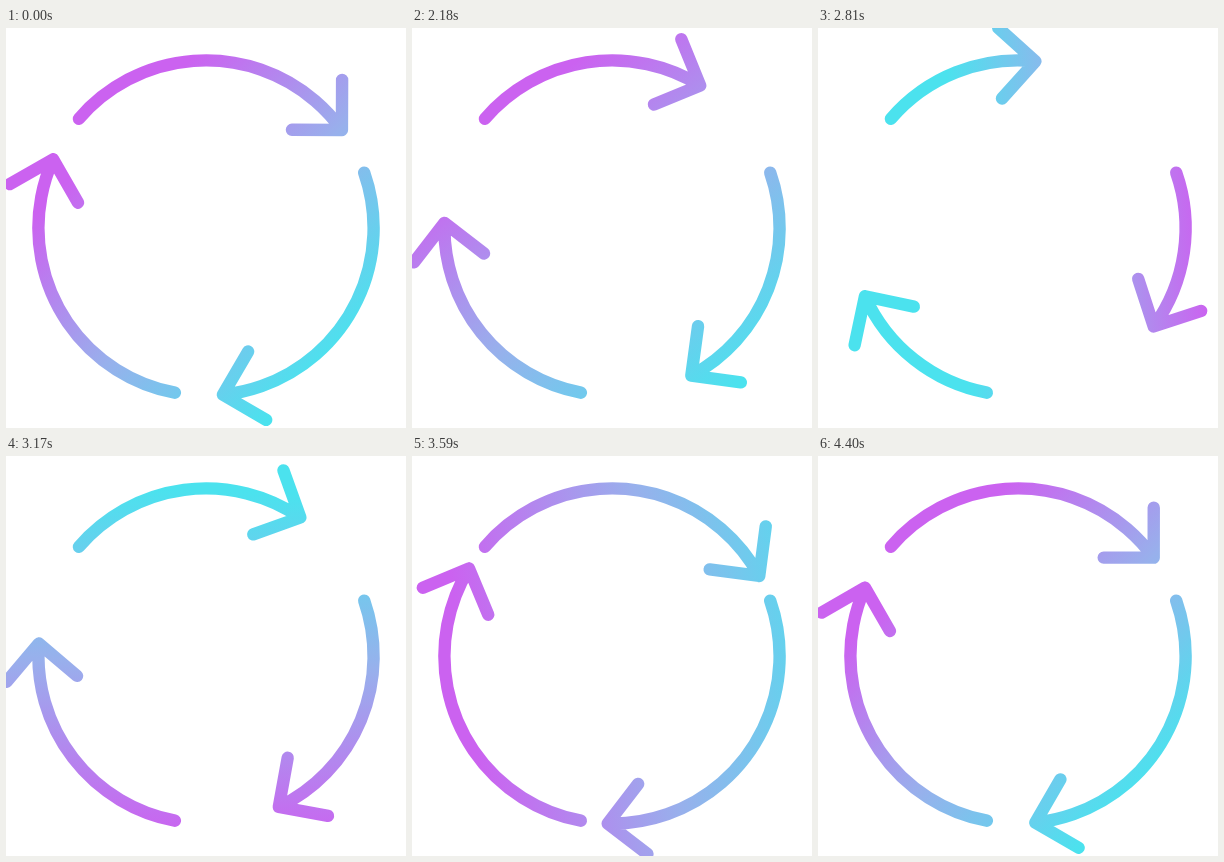
An HTML page with a canvas that plays this animation: 400 by 400 pixels, repeating every 4.43 s.

```html
<!DOCTYPE html>
<html lang="en">
<head>
<meta charset="utf-8">
<title>Cycle arrows</title>
<style>
  html, body { margin: 0; width: 100%; height: 100%; overflow: hidden; background: #fff; }
  canvas { display: block; width: 400px; height: 400px; }
</style>
</head>
<body>
<canvas id="stage" width="400" height="400"></canvas>
<script>
const ctx = document.getElementById('stage').getContext('2d');
const LOOP = 4430, HOLD = 2000, STEP = 30, MOVE = LOOP - HOLD;
const CENTER = 200, RADIUS = 167.6, ARM = 50;
const TAILS = [220.7, 340.7, 100.7];
const rad = deg => deg * Math.PI / 180;

// Cubic timing curve with control points (x1, 0) and (x2, 1).
function ease(u, x1, x2) {
  let lo = 0, hi = 1;
  for (let i = 0; i < 24; i++) {
    const m = (lo + hi) / 2, n = 1 - m;
    const x = 3 * x1 * m * n * n + 3 * x2 * m * m * n + m * m * m;
    if (x < u) lo = m; else hi = m;
  }
  return lo * lo * (3 - 2 * lo);
}

// Each key: time, value, then the timing curve leading to the next key.
function track(keys, time) {
  let i = 0;
  while (i < keys.length - 2 && time >= keys[i + 1][0]) i++;
  const [t0, v0, x1 = 0.36, x2 = 0.64] = keys[i];
  const [t1, v1] = keys[i + 1];
  return v0 + (v1 - v0) * ease((time - t0) / (t1 - t0), x1, x2);
}

const SPAN = [
  [0, 103.5, 0.24, 0.02],
  [860, 55.2, 0.43, 0.6],
  [1470, 112.5, 0.39, 0.6],
  [2060, 93.8, 0.5, 0.6],
  [MOVE, 103.5]
];
const WARM_REACH = [[0, 130], [330, 170], [810, 185], [1170, 182], [1590, 148], [MOVE, 130]];
const COOL_REACH = [[0, 180], [330, 215], [810, 60], [1170, 165], [1590, 240], [MOVE, 180]];

function polar(x, y, length, deg) {
  return [x + length * Math.cos(rad(deg)), y + length * Math.sin(rad(deg))];
}

function paint(time) {
  const angle = 225 + 360 * ease(time / MOVE, 0.33, 0.42);
  const warm = polar(CENTER, CENTER, track(WARM_REACH, time), angle);
  const cool = polar(CENTER, CENTER, track(COOL_REACH, time), angle + 180);
  const gradient = ctx.createLinearGradient(...warm, ...cool);
  gradient.addColorStop(0, '#cb62f0');
  gradient.addColorStop(0.5, '#98b0ec');
  gradient.addColorStop(1, '#4be2ee');
  return gradient;
}

function drawArrow(tail, span) {
  const end = tail + span;
  const tip = polar(CENTER, CENTER, RADIUS, end);
  ctx.beginPath();
  ctx.arc(CENTER, CENTER, RADIUS, rad(tail), rad(end));
  ctx.moveTo(...polar(...tip, ARM, end - 54));
  ctx.lineTo(...tip);
  ctx.lineTo(...polar(...tip, ARM, end - 144));
  ctx.stroke();
}

function draw(now) {
  const elapsed = now % LOOP - HOLD;
  const time = Math.max(0, Math.floor(elapsed / STEP) * STEP);
  const span = track(SPAN, time);
  ctx.fillStyle = '#fff';
  ctx.fillRect(0, 0, 400, 400);
  ctx.lineWidth = 12.4;
  ctx.lineCap = ctx.lineJoin = 'round';
  ctx.strokeStyle = paint(time);
  for (const tail of TAILS) drawArrow(tail, span);
}

const start = performance.now();
function tick() {
  draw(performance.now() - start);
  requestAnimationFrame(tick);
}
tick();
</script>
</body>
</html>
```
